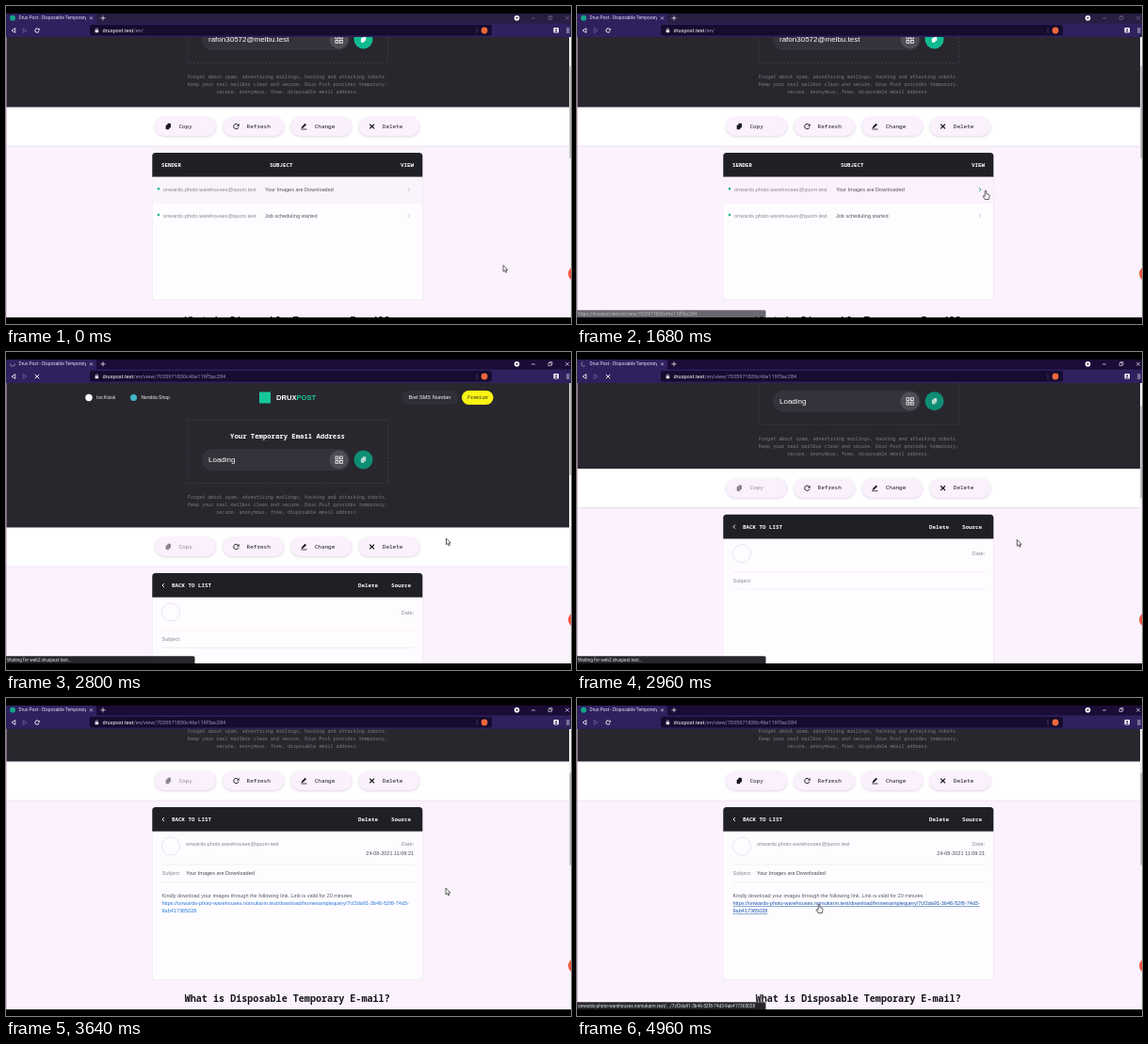
Recreate the animation shown at these times as an HTML page with a canvas. Size 600x338 px, loop 5 s.

```html
<!DOCTYPE html>
<html lang="en">
<head>
<meta charset="utf-8">
<title>Disposable mail</title>
<style>
  html, body { margin: 0; width: 100%; height: 100%; overflow: hidden; background: #000; }
  canvas { display: block; width: 100vw; height: 100vh; }
</style>
</head>
<body>
<canvas id="stage"></canvas>
<script>
const W = 600, H = 338, LOOP = 5000;
const SANS = '"Liberation Sans", Arial, sans-serif';
const MONO = '"Noto Sans Mono", "DejaVu Sans Mono", monospace';
const UI = 'Roboto, "Open Sans", sans-serif';
const SENDER = 'onwards.photo.warehouses@quom.test';
const SUBJECT = 'Your Images are Downloaded';
const SITE = 'druxpost.test';
const MAIL_PATH = '/en/view/7035971830c46e119f5ac284';
const LINK_HOST = 'onwards-photo-warehouses.nomukarm.test';
const LINK_ID = ['7cf2da91-3b46-52f8-74d3-', '9ab417365028'];

// Moments of the story, in ms
const CLICK = 1880, NEW_PAGE = 2440, LOADED = 3000, LINK_HOVER = 4680;

const canvas = document.getElementById('stage');
const c = canvas.getContext('2d');

const span = (t, a, b) => Math.min(1, Math.max(0, (t - a) / (b - a)));
const smooth = p => p * p * (3 - 2 * p);

function rect(x, y, w, h, fill, r = 0) {
  c.fillStyle = fill;
  c.beginPath();
  c.roundRect(x, y, w, h, r);
  c.fill();
}
function circle(x, y, r, fill) {
  c.fillStyle = fill;
  c.beginPath();
  c.arc(x, y, r, 0, 7);
  c.fill();
}
function line(points, color, width = 0.8, closed = false) {
  c.beginPath();
  points.forEach(([x, y]) => c.lineTo(x, y));
  if (closed) c.closePath();
  c.lineWidth = width;
  c.strokeStyle = color;
  c.stroke();
}
function polygon(points, color) {
  c.beginPath();
  points.forEach(([x, y]) => c.lineTo(x, y));
  c.fillStyle = color;
  c.fill();
}
function arc(x, y, r, from, to, color, width) {
  c.beginPath();
  c.arc(x, y, r, from, to);
  c.lineWidth = width;
  c.strokeStyle = color;
  c.stroke();
}
function text(s, x, y, size, color, family = SANS, { weight = 400, align = 'left', underline = false } = {}) {
  c.font = `${weight} ${size}px ${family}`;
  c.textAlign = align;
  c.fillStyle = color;
  c.fillText(s, x, y);
  const w = c.measureText(s).width;
  if (underline) c.fillRect(x, y + size * 0.47, w, 0.5);
  return w;
}
function at(x, y, draw) {
  c.save();
  c.translate(x, y);
  draw();
  c.restore();
}

const icons = {
  copy(color) {
    rect(-2.6, -1.6, 3.6, 4.8, color, 0.8);
    rect(-0.9, -3.2, 3.6, 4.8, color, 0.8);
  },
  reload(color, r = 2.7) {
    arc(0, 0, r, 0.3, 5.4, color, 0.9);
    polygon([[r + 0.5, -r - 0.3], [r + 0.5, -0.2], [0.4, -0.4]], color);
  },
  pencil(color) {
    line([[-1.6, 0.9], [1.8, -2.5]], color, 1.9);
    polygon([[-2.9, 2.2], [-2.3, 0.1], [-0.8, 1.6]], color);
    line([[-3.2, 3], [3, 3]], color);
  },
  cross(color, r = 2.4, width = 1.3) {
    line([[-r, -r], [r, r]], color, width);
    line([[r, -r], [-r, r]], color, width);
  }
};

function chevron(x, y, dir, color) {
  line([[x - dir, y - 2], [x + dir, y], [x - dir, y + 2]], color, 0.9);
}

function browserBar(t) {
  const loading = t >= CLICK && t < LOADED;
  const active = t >= CLICK;
  const strip = active ? '#1b0b37' : '#291d42';
  rect(0, 8, W, 11, strip);
  rect(0, 8, 96, 11, '#2f215e', [0, 2, 0, 0]);
  rect(0, 18.5, W, 14.5, '#2f215e');

  if (loading) {
    arc(7, 12.8, 2.4, t / 150, t / 150 + 3.5, t < NEW_PAGE ? '#8d4350' : '#8d84a8', 1);
  } else circle(7, 12.8, 3, '#12a58b');
  c.save();
  c.beginPath();
  c.rect(0, 8, 85, 11);
  c.clip();
  text('Drux Post - Disposable Temporary', 13.5, 13, 4.8, '#e4dff0', UI);
  c.restore();
  at(90.5, 12.8, () => icons.cross('#e4dff0', 1.5, 0.7));
  line([[100.5, 12.8], [105.5, 12.8]], '#fff', 0.7);
  line([[103, 10.3], [103, 15.3]], '#fff', 0.7);

  circle(542.5, 12.8, 2.8, '#fff');
  polygon([[541.2, 12], [543.8, 12], [542.5, 14]], strip);
  const control = active ? '#f1eef6' : '#766b8c';
  line([[558, 13], [562, 13]], control, 0.7);
  line([[576, 11.6], [579, 11.6], [579, 14.6], [576, 14.6]], control, 0.6, true);
  line([[577, 11.4], [577, 10.6], [580, 10.6], [580, 13.6], [579.2, 13.6]], control, 0.6);
  at(596, 12.8, () => icons.cross(control, 1.9, 0.7));

  const triangle = (x, dir, color) =>
    line([[x + 1.8 * dir, 23.6], [x + 1.8 * dir, 28.4], [x - 2 * dir, 26]], color, 0.8, true);
  triangle(8, 1, '#fff');
  triangle(20, -1, '#6c6190');
  at(33, 26, () => loading ? icons.cross('#fff', 2.2, 0.9) : icons.reload('#fff', 2.2));

  rect(89, 20, 427, 11.5, '#150c2f', 2);
  rect(94.6, 25.2, 3.6, 3, '#e6e2f0', 0.4);
  arc(96.4, 25, 1.2, Math.PI, 0, '#e6e2f0', 0.6);
  const w = text(SITE, 102.5, 26.2, 5.6, '#fff', UI);
  text(t < CLICK ? '/en/' : MAIL_PATH, 102.5 + w, 26.2, 5.6, '#9c93b8', UI);
  line([[500, 23], [500, 29]], '#5a4c86', 0.6);
  circle(508, 26, 3.4, '#f0673c');

  rect(581.5, 23, 5.5, 5.5, '#fff', 0.8);
  circle(584.2, 25, 0.9, '#2f215e');
  rect(582.7, 26.5, 3, 1.2, '#2f215e', 0.6);
  for (const y of [24, 26, 28]) line([[595, y], [598.5, y]], '#fff', 0.7);
}

function siteHeader(loadingAddress) {
  rect(0, 33, 598, 154, '#28272e');
  circle(88, 48.5, 3.7, '#fff');
  text('Ivo Kiosk', 96, 48.7, 5, '#f2f2f2');
  circle(135.5, 48.5, 3.5, '#3fb6c9');
  text('Nembla Shop', 143.5, 48.7, 5, '#f2f2f2');
  rect(269, 42.5, 12, 12, '#16c79a');
  const w = text('DRUX', 287, 49, 7.6, '#fff', SANS, { weight: 700 });
  text('POST', 287 + w, 49, 7.6, '#16c79a', SANS, { weight: 700 });
  rect(419.5, 41, 61, 15, '#302f37', 7.5);
  text('Brel SMS Number', 450, 48.7, 5.6, '#f4f4f4', SANS, { align: 'center' });
  rect(484, 41, 33.5, 15, '#fbf414', 7.5);
  text('Premium', 500.8, 48.7, 5.1, '#39381c', MONO, { align: 'center' });

  c.setLineDash([2, 2]);
  line([[193, 72.5], [405.5, 72.5], [405.5, 139.5], [193, 139.5]], '#4a4951', 0.6, true);
  c.setLineDash([]);
  text('Your Temporary Email Address', 299, 89.5, 7.25, '#fff', MONO, { weight: 700, align: 'center' });
  rect(208, 103, 157, 23, '#34333b', 11.5);
  text(loadingAddress ? 'Loading' : 'rafon30572@melbu.test', 215, 115, 8, '#fff');
  circle(353.5, 114.5, 10, '#4e4d56');
  c.strokeStyle = '#eee';
  c.lineWidth = 0.9;
  for (const x of [350, 354.5]) for (const y of [111, 115.5]) c.strokeRect(x, y, 2.8, 2.8);
  circle(379.5, 114.5, 10, loadingAddress ? '#0e8e74' : '#10bb92');
  at(379.5, 114.5, () => icons.copy(loadingAddress ? '#b9d9d1' : '#fff'));

  ['Forget about spam, advertising mailings, hacking and attacking robots.',
   'Keep your real mailbox clean and secure. Drux Post provides temporary,',
   'secure, anonymous, free, disposable email address.']
    .forEach((s, i) => text(s, 299, 155 + i * 8, 5.05, '#7d7c83', MONO, { align: 'center' }));
}

function toolbar(copyEnabled) {
  c.save();
  c.shadowColor = 'rgba(70,50,90,.3)';
  c.shadowBlur = 3;
  rect(0, 186.4, 598, 41, '#fff');
  c.restore();
  [['Copy', 'copy'], ['Refresh', 'reload'], ['Change', 'pencil'], ['Delete', 'cross']].forEach(([label, icon], i) => {
    const x = 158.3 + i * 72.1;
    c.save();
    c.shadowColor = 'rgba(140,90,160,.3)';
    c.shadowBlur = 3;
    c.shadowOffsetY = 0.8;
    rect(x, 197, 64.5, 20, '#faf1fc', 10);
    c.restore();
    const color = i || copyEnabled ? '#17161c' : '#89868f';
    at(x + 14, 207, () => icons[icon](color));
    text(label, x + 25.2, 207, 6, color, MONO, { weight: 500 });
  });
}

function card(height, headingGap) {
  rect(155, 235, 287.5, height, '#e9e2ed', 3.5);
  rect(155.5, 235, 286.5, height - 0.5, '#fefcff', 3.5);
  rect(155.3, 235, 287, 25.7, '#1f2026', [3.5, 3.5, 0, 0]);
  text('What is Disposable Temporary E-mail?', 298.7, 235 + height + headingGap, 10.1, '#16151b', MONO,
    { weight: 700, align: 'center' });
}
const cardTitle = (s, x, align) => text(s, x, 248.2, 5.85, '#fff', MONO, { weight: 700, align });

function inbox(cursor) {
  card(157, 22.5);
  cardTitle('SENDER', 165);
  cardTitle('SUBJECT', 280);
  cardTitle('VIEW', 433, 'right');
  const hovered = cursor.y > 181 && cursor.y < 209 && cursor.x < 442;
  rect(155.5, 260.7, 286.5, 28.3, hovered ? '#fbf1fc' : '#f9f4fc');
  [SUBJECT, 'Job scheduling started'].forEach((subject, i) => {
    const y = 274.6 + i * 27.8, active = hovered && !i;
    circle(162, y - 1.3, 1.3, '#14b78f');
    text(SENDER, 167, y, 5.6, '#8a8890', SANS, { underline: active && cursor.x < 350 });
    text(subject, 275, y, 5.55, '#55535b');
    chevron(428, y - 0.5, 1, active ? '#129c7c' : '#c4c1c9');
  });
}

function message(t) {
  const loaded = t >= LOADED, right = { align: 'right' };
  card(184, 20.5);
  chevron(167, 248, -1, '#fff');
  cardTitle('BACK TO LIST', 176);
  cardTitle('Delete', 395, 'right');
  cardTitle('Source', 430, 'right');
  arc(175, 276.5, 9.6, 0, 7, '#e4dfe8', 0.8);
  for (const y of [296, 314.5]) line([[165, y], [433, y]], '#ece7ef', 0.6);
  text('Date:', 433, loaded ? 274 : 277.2, 5.5, '#8a8890', SANS, right);
  text('Subject:', 165.5, 305.3, 5.5, '#8a8890');
  if (!loaded) return;
  text(SENDER, 191, 274.2, 5.6, '#8a8890');
  text('24-08-2021 11:09:21', 433, 284.3, 5.5, '#4b4951', SANS, right);
  text(SUBJECT, 191, 305.3, 5.55, '#4b4951');
  text('Kindly download your images through the following link. Link is valid for 20 minutes',
    165.5, 329.2, 5.52, '#5b5961');
  const hover = t >= LINK_HOVER, color = hover ? '#1453a8' : '#2a78d8';
  text(`https://${LINK_HOST}/download/homesamplequery/${LINK_ID[0]}`, 165.5, 337.4, 5.54, color, SANS, { underline: hover });
  text(LINK_ID[1], 165.5, 345.4, 5.54, color, SANS, { underline: hover });
}

function page(t, cursor) {
  const onMessage = t >= NEW_PAGE;
  const scroll = onMessage ? 119 * (1 - (1 - span(t, 2880, 3250)) ** 3) : 79;
  c.save();
  c.beginPath();
  c.rect(0, 33, W, 298);
  c.clip();
  rect(0, 33, W, 298, '#fbf2fd');
  at(0, -scroll, () => {
    siteHeader(onMessage);
    toolbar(!onMessage || t >= 4800);
    if (onMessage) message(t); else inbox(cursor);
  });
  rect(0, 33, 0.6, 298, '#c9a3c9');
  rect(598.3, 33, 1.7, 298, '#f3f0f4');
  rect(598.5, 33 + scroll * 0.39, 1.5, 98, '#b3b0b6');
  circle(605, 284.6, 8, '#f4573f');
  c.restore();
}

function statusBar(t) {
  let message = '', alpha = 1;
  if (t >= 1600 && t < CLICK) {
    message = `https://${SITE}${MAIL_PATH}`;
    alpha = span(t, 1600, 1720);
  } else if (t >= CLICK && t < LOADED) {
    message = `Waiting for web2.${SITE}...`;
  } else if (t >= 4740) {
    message = `${LINK_HOST}/.../${LINK_ID.join('')}`;
    alpha = span(t, 4740, 4860);
  }
  if (!message) return;
  c.globalAlpha = alpha;
  rect(0, 323.3, 200.5, 7.7, '#27272b', [0, 1.5, 0, 0]);
  text(message, 1, 327.6, 4.75, '#e8e8ea', UI);
  c.globalAlpha = 1;
}

// Pointer hot spot: time, x, y
const POINTER = [
  [0, 528, 275.5], [280, 528, 275.5], [1000, 286, 196.5], [1140, 286, 196.5],
  [1600, 434, 196.5], [2300, 434, 196.5], [2620, 467.5, 198], [2880, 467.5, 198],
  [3080, 467, 202], [3800, 467, 202], [4360, 349, 210], [4480, 349, 210],
  [4760, 257, 219.5], [LOOP, 257, 219.5]
];
function pointerAt(t) {
  const i = POINTER.findIndex(k => k[0] > t);
  const [t0, x0, y0] = POINTER[i - 1], [t1, x1, y1] = POINTER[i];
  const p = smooth((t - t0) / (t1 - t0));
  const x = x0 + (x1 - x0) * p, y = y0 + (y1 - y0) * p;
  let shape = 'arrow';
  if (t < NEW_PAGE) { if (x < 440 && y < 209) shape = 'hand'; }
  else if (t >= LINK_HOVER) shape = 'hand';
  else if (t > LOADED && x < 368) shape = 'beam';
  return { x, y, shape };
}

const SHAPES = {
  arrow: 'M0 0V6.8L1.6 5.4 2.6 7.8 3.8 7.3 2.8 5H4.7Z',
  hand: 'M-.8 0Q0-.9.8 0V3.2L3.7 4Q4.2 4.3 4.1 5L3.3 9H-.9L-2.9 5.8Q-2.7 4.7-1.7 5.3L-.8 6Z',
  beam: 'M-1.3-3.6H1.3M0-3.6V3.6M-1.3 3.6H1.3'
};
function drawPointer({ x, y, shape }) {
  at(x, y, () => {
    const outline = new Path2D(SHAPES[shape]);
    c.fillStyle = '#fff';
    c.strokeStyle = '#222';
    c.lineWidth = 0.7;
    if (shape !== 'beam') c.fill(outline);
    c.stroke(outline);
  });
}

function frame(now) {
  const t = now % LOOP;
  const scale = window.devicePixelRatio || 1;
  const w = Math.round(innerWidth * scale), h = Math.round(innerHeight * scale);
  if (canvas.width !== w || canvas.height !== h) { canvas.width = w; canvas.height = h; }
  c.setTransform(w / W, 0, 0, h / H, 0, 0);
  c.textBaseline = 'middle';
  rect(0, 0, W, H, '#000');
  const cursor = pointerAt(t);
  page(t, cursor);
  browserBar(t);
  statusBar(t);
  drawPointer(cursor);
  requestAnimationFrame(frame);
}
requestAnimationFrame(frame);
</script>
</body>
</html>
```
